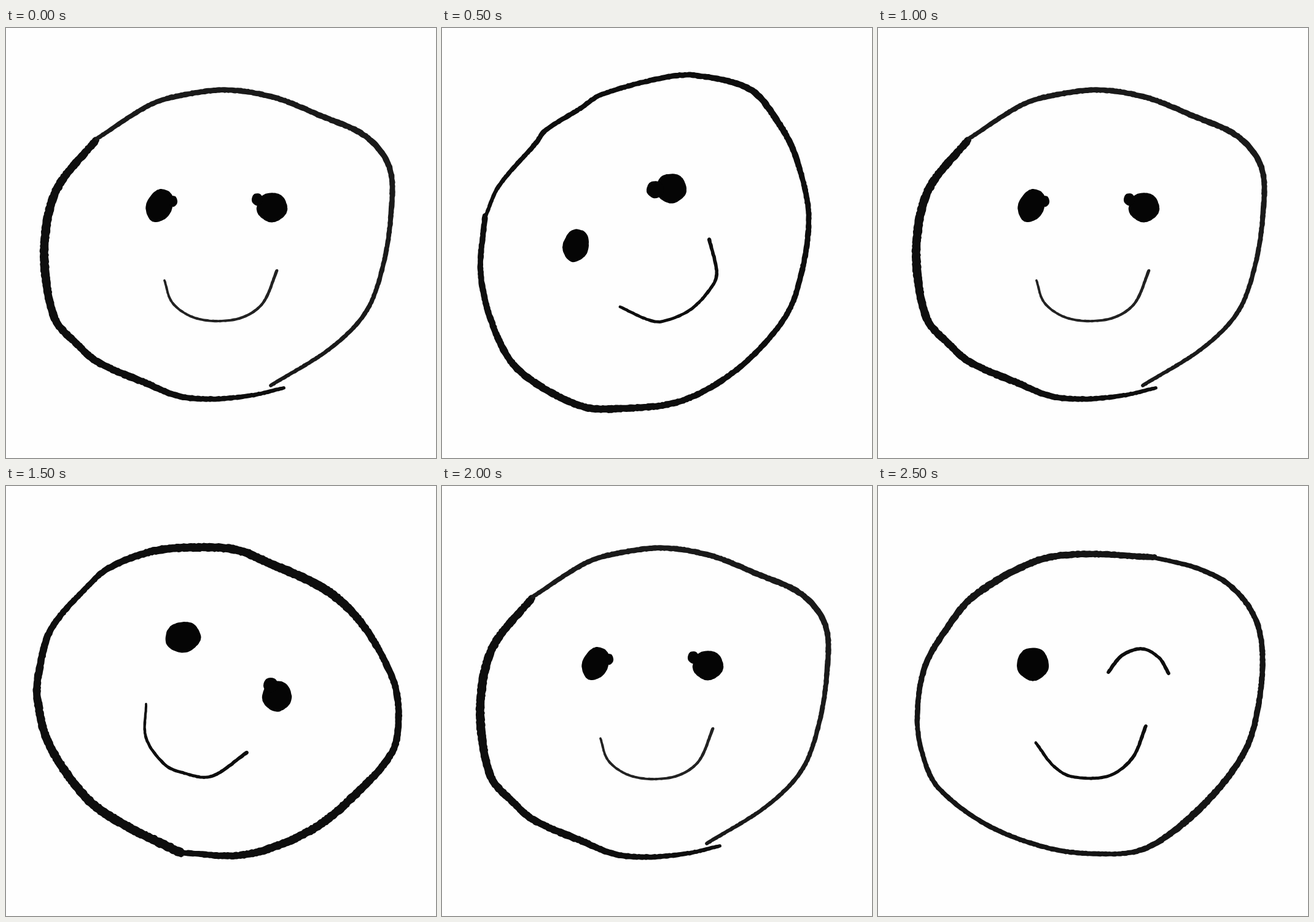
Recreate the animation shown at these times as an HTML page. Size 700x700 px, loop 3 s.

```html
<!DOCTYPE html>
<html lang="en">
<head>
<meta charset="utf-8">
<title>Doodle face</title>
<style>
html, body { margin: 0; width: 100%; height: 100%; overflow: hidden; background: #fefefe; }
svg { display: block; width: 100%; height: 100%; filter: blur(0.6px); }
</style>
</head>
<body>
<svg id="stage" viewBox="0 0 700 700"></svg>
<script>
const HOLD = 500;

// A line is a few key points plus pen widths spread evenly along it.
// An eye is one or more ellipses: x, y, rx, ry, tilt in degrees.
const front = {
  lines: [
    { at: "452,586 400,598 335,604 280,599 230,579 150,544 115,514 81,476 65,410 64,335 84,260 146,183",
      widths: [6, 9, 12, 12, 14, 14, 12] },
    { at: "148,180 237,124 300,107 365,101 440,114 510,142 585,176 624,226 627,300 613,390 586,462 530,520 431,582",
      widths: [7, 9, 9, 10, 8, 7, 6], tone: "#1a1a1a" },
    { at: "258,411 270,446 300,469 340,477 385,471 418,448 441,395", widths: [4, 4, 5], tone: "#222" }
  ],
  eyes: [[250, 289, 21, 28, 25], [272, 282, 7, 9, 0], [433, 292, 25, 24, 0], [409, 279, 9, 10, 0]]
};

const tiltLeft = {
  lines: [
    { at: "70,306 63,400 85,490 125,557 225,615 300,619 390,607 475,560 545,490 577,430 597,310 576,210 " +
        "545,150 500,99 410,77 355,82 258,109 225,131 168,167 153,187 92,258 71,306",
      widths: [9, 10, 12, 12, 10, 9, 9, 9, 11, 9, 8, 8, 6] },
    { at: "290,454 333,474 357,478 405,458 442,417 447,395 435,344", widths: [5, 5, 6] }
  ],
  eyes: [[218, 354, 21, 27, 15], [373, 261, 25, 24, 0], [347, 263, 14, 14, 0]]
};

const tiltRight = {
  lines: [
    { at: "284,597 190,550 130,507 70,420 51,345 54,300 74,232 140,156 170,132 240,106 310,100 375,104 " +
        "425,124 522,170 580,225 628,310 639,365 630,430 575,496 497,560 390,600 284,597",
      widths: [15, 15, 14, 12, 9, 13, 14, 15, 11, 11, 14, 13, 9] },
    { at: "228,355 228,410 258,453 285,466 333,473 392,434", widths: [4, 5, 5, 6] }
  ],
  eyes: [[288, 246, 29, 25, -10], [441, 342, 24, 25, 0], [431, 324, 12, 12, 0]]
};

const wink = {
  lines: [
    { at: "450,116 330,111 255,123 155,180 110,235 76,295 64,375 72,435 98,491 180,553 280,590 365,599 " +
        "430,592 490,555 555,492 598,430 617,370 626,280 614,215 573,162 520,134 448,116",
      widths: [10, 11, 12, 10, 8, 8, 8, 8, 12, 10, 9, 9, 7], tone: "#151515" },
    { at: "257,418 285,455 315,473 375,472 414,443 436,391", widths: [5, 5, 6] },
    { at: "375,303 397,276 430,265 458,280 473,305", widths: [6, 6, 5, 6] }
  ],
  eyes: [[252, 290, 26, 27, 0]]
};

const order = [front, tiltLeft, front, tiltRight, front, wink];

function random(seed) {
  return () => (seed = seed * 16807 % 2147483647) / 2147483647;
}

const range = n => Array.from({ length: n }, (_, i) => i);
const dist = (a, b) => Math.hypot(b[0] - a[0], b[1] - a[1]);
const toPath = pts => "M" + pts.map(p => p[0].toFixed(1) + " " + p[1].toFixed(1)).join("L") + "Z";
const shape = (pts, fill) => `<path d="${toPath(pts)}" fill="${fill}"/>`;

// Smooth curve through the points, its slopes scaled by the point spacing.
function smooth(pts) {
  const last = pts.length - 1;
  const slope = i => {
    const a = Math.max(0, i - 1), b = Math.min(last, i + 1);
    const span = dist(pts[a], pts[i]) + dist(pts[i], pts[b]);
    return [0, 1].map(j => (pts[b][j] - pts[a][j]) / span);
  };
  const curve = pts.slice(0, last).flatMap((p, i) => {
    const q = pts[i + 1], h = dist(p, q), m = slope(i), n = slope(i + 1);
    const steps = Math.ceil(h / 3);
    return range(steps).map(k => {
      const t = k / steps, u = 1 - t;
      return [0, 1].map(j => u * u * ((1 + 2 * t) * p[j] + t * h * m[j]) +
        t * t * ((3 - 2 * t) * q[j] - u * h * n[j]));
    });
  });
  return [...curve, pts[last]];
}

function widthAt(widths, t) {
  const x = t * (widths.length - 1), i = Math.min(Math.floor(x), widths.length - 2);
  return widths[i] + (widths[i + 1] - widths[i]) * (x - i);
}

// Outline of a pen line with rough edges and round ends.
function pen({ at, widths, tone = "#0e0e0e" }) {
  const line = smooth(at.split(" ").map(p => p.split(",").map(Number)));
  const last = line.length - 1, rnd = random(last);
  const edge = (i, turn, rough) => {
    const p = line[Math.max(0, i - 1)], q = line[Math.min(last, i + 1)];
    const dir = Math.atan2(q[1] - p[1], q[0] - p[0]) + turn;
    const r = widthAt(widths, i / last) / 2 * (1 + (rnd() - 0.5) * rough);
    return [line[i][0] + r * Math.cos(dir), line[i][1] + r * Math.sin(dir)];
  };
  const side = turn => line.map((_, i) => edge(i, turn, 0.2));
  const cap = (i, from) => range(4).map(k => edge(i, from + (k + 1) * Math.PI / 5, 0));
  const quarter = Math.PI / 2;
  return shape([...side(-quarter), ...cap(last, -quarter), ...side(quarter).reverse(), ...cap(0, quarter)], tone);
}

// Filled ellipse with a slightly wobbly edge.
function blob([x, y, rx, ry, tilt]) {
  const rnd = random(x + y), a = tilt * Math.PI / 180, phase = rnd() * 6;
  return shape(range(60).map(i => {
    const t = i / 60 * 2 * Math.PI;
    const r = 1 + 0.02 * Math.sin(5 * t + phase) + 0.02 * (rnd() - 0.5);
    const u = rx * r * Math.cos(t), v = ry * r * Math.sin(t);
    return [x + u * Math.cos(a) - v * Math.sin(a), y + u * Math.sin(a) + v * Math.cos(a)];
  }), "#050505");
}

const face = ({ lines, eyes }) => `<g>${lines.map(pen).join("")}${eyes.map(blob).join("")}</g>`;

const poses = [...new Set(order)];
const stage = document.getElementById("stage");
stage.innerHTML = poses.map(face).join("");
const groups = [...stage.children];

function draw(ms) {
  const now = order[Math.floor(ms / HOLD) % order.length];
  groups.forEach((g, i) => g.setAttribute("visibility", poses[i] === now ? "visible" : "hidden"));
}

const start = performance.now();
function tick() {
  draw(Math.max(0, performance.now() - start));
  requestAnimationFrame(tick);
}
tick();
</script>
</body>
</html>
```
